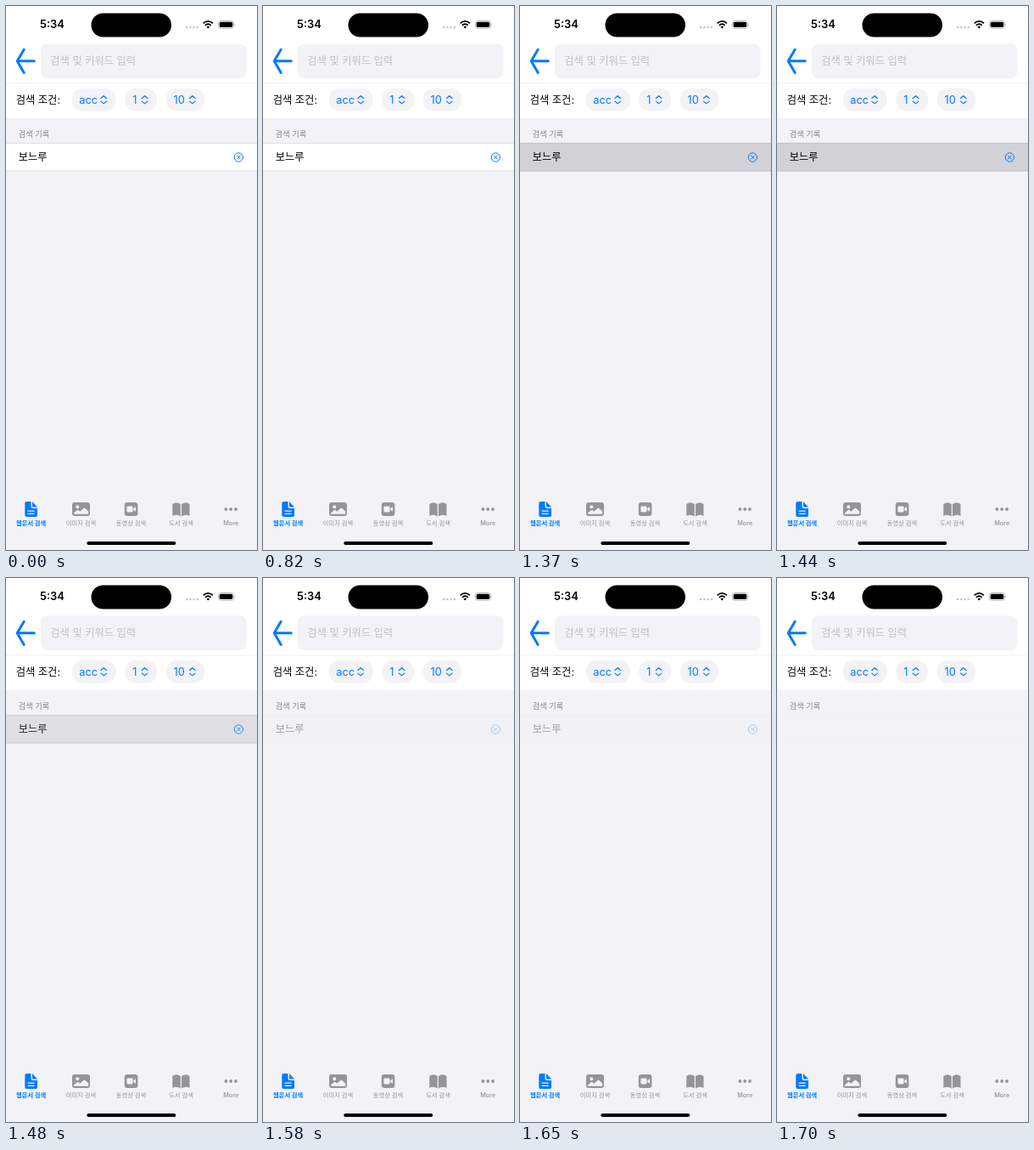
These frames come from a looping animation (296 by 640 pixels, 1.76 s). An HTML page:

```html
<!DOCTYPE html>
<html lang="ko">
<head>
<meta charset="utf-8">
<title>검색</title>
<style>
  html, body { margin: 0; width: 100%; height: 100%; overflow: hidden; background: #fff; }
  svg { display: block; width: 296px; height: 640px; }
  text { font-family: Inter, "Noto Sans CJK KR", "Noto Sans CJK", sans-serif; font-size: 12.3px; }
  .blue { fill: #007aff; }
  .line { fill: none; stroke: #007aff; stroke-linecap: round; stroke-linejoin: round; }
  .pale { fill: #f2f2f7; }
  .tab { fill: #949499; }
  .tab text, text.tab { font-size: 7.25px; font-weight: 500; text-anchor: middle; }
  .tab.on { fill: #007aff; }
  .opt { font-size: 12.8px; }
</style>
</head>
<body>
<svg viewBox="0 0 296 640">
  <defs>
    <path id="updown" class="line" stroke-width="1.2" d="M-3.3 -1.8L0 -4.6L3.3 -1.8M-3.3 1.8L0 4.6L3.3 1.8"/>
  </defs>
  <rect width="296" height="640" fill="#fff"/>
  <rect class="pale" y="132" width="296" height="508"/>

  <!-- status bar -->
  <text x="40" y="26.3" style="font-size:12.9px;font-weight:600">5:34</text>
  <rect x="100.5" y="8.5" width="94.5" height="28" rx="14"/>
  <g fill="#c4c4c6">
    <circle cx="213.2" cy="25" r="1.3"/><circle cx="217.4" cy="25" r="1.3"/>
    <circle cx="221.6" cy="25" r="1.3"/><circle cx="225.8" cy="25" r="1.3"/>
  </g>
  <g fill="none" stroke="#000" stroke-width="1.8">
    <path d="M232.6 20.4Q238.3 15.4 244 20.4M234.9 22.8Q238.3 19.8 241.7 22.8"/>
  </g>
  <path d="M236.4 24.6Q238.3 23 240.2 24.6L238.3 26.6Z"/>
  <rect x="250.4" y="17.4" width="18.2" height="9" rx="3" fill="none" stroke="#a8a8a8" stroke-width=".8"/>
  <rect x="251.7" y="18.7" width="15.6" height="6.4" rx="1.8"/>
  <path d="M269.6 20.4Q271 21.9 269.6 23.4Z" fill="#a8a8a8"/>

  <!-- search field -->
  <path class="line" stroke-width="3" d="M21.2 51.2L13.2 64.8L21.2 78.4M13.5 64.8H33.3"/>
  <rect class="pale" x="41" y="44.5" width="242.5" height="40.5" rx="7.5"/>
  <text x="52.3" y="69.3" fill="#c2c2c5">검색 및 키워드 입력</text>
  <rect y="90.5" width="296" height="1" fill="#efeff1"/>

  <!-- options -->
  <text x="11.7" y="114.8">검색 조건:</text>
  <g class="pale">
    <rect x="78" y="97" width="51.5" height="26.5" rx="12"/>
    <rect x="140.5" y="97" width="37.5" height="26.5" rx="12"/>
    <rect x="189" y="97" width="45" height="26.5" rx="12"/>
  </g>
  <g class="blue">
    <text class="opt" x="86.3" y="114.8">acc</text>
    <text class="opt" x="149.3" y="114.8">1</text>
    <text class="opt" x="197.6" y="114.8">10</text>
  </g>
  <use href="#updown" x="115.2" y="110.3"/>
  <use href="#updown" x="163.6" y="110.3"/>
  <use href="#updown" x="219.8" y="110.3"/>

  <!-- history -->
  <text x="14.8" y="154" fill="#858589" style="font-size:9.2px">검색 기록</text>
  <rect id="cell" y="161" width="296" height="33.5" fill="#fff"/>
  <path id="edges" d="M0 161.4H296M0 194.1H296" stroke="#d6d6d9" stroke-width=".8"/>
  <g id="entry">
    <text x="14.8" y="182.3" style="font-size:12.2px">보느루</text>
    <circle class="line" cx="274.4" cy="178" r="5.2" stroke-width="1"/>
    <path class="line" stroke-width="1" d="M272.5 175.9L276.3 180.1M276.3 175.9L272.5 180.1"/>
  </g>

  <!-- tab bar -->
  <g class="tab on">
    <path d="M24.5 583H29.5V588.5Q29.5 591 32 591H37V599Q37 601 35 601H24.5Q22.3 601 22.3 599V585Q22.3 583 24.5 583Z"/>
    <path d="M31 583L37 589.4H32.2Q31 589.4 31 588.2Z"/>
    <path d="M25.6 594.2H33.7M25.6 597.3H33.7" stroke="#f2f2f7" stroke-width="1.2"/>
    <text x="29.6" y="611.2" style="font-weight:700">웹문서 검색</text>
  </g>
  <g class="tab">
    <rect x="78" y="584" width="21" height="16" rx="3"/>
    <circle class="pale" cx="84.3" cy="589.2" r="2"/>
    <path class="pale" d="M80 597.8V596.5L83.8 593.2Q84.7 592.5 85.6 593.2L87.3 594.7L91.5 590.9Q92.4 590.2 93.3 590.9L97.2 594.6V597.8Z"/>
    <text x="88.5" y="611.2">이미지 검색</text>
  </g>
  <g class="tab">
    <rect x="139.8" y="584" width="15.6" height="16" rx="3"/>
    <rect class="pale" x="142.4" y="588.6" width="7.2" height="6.8" rx="1.4"/>
    <path class="pale" d="M150.4 591.1L153 589.2V594.8L150.4 592.9Z"/>
    <text x="147.5" y="611.2">동영상 검색</text>
  </g>
  <g class="tab">
    <path d="M205.8 586V600.4Q201.2 597.4 196.3 600V586Q200.8 582.4 205.8 586Z"/>
    <path d="M207 586V600.4Q211.6 597.4 216.5 600V586Q212 582.4 207 586Z"/>
    <text x="206.5" y="611.2">도서 검색</text>
  </g>
  <g class="tab">
    <circle cx="259.4" cy="592" r="1.9"/><circle cx="265.2" cy="592" r="1.9"/><circle cx="271" cy="592" r="1.9"/>
    <text x="265.2" y="611.2">More</text>
  </g>
  <rect x="95.3" y="630" width="105" height="4" rx="2"/>
</svg>
<script>
  const LOOP = 1760;
  // start ms, cell fill, edge colour, entry opacity
  const steps = [
    [0,    '#ffffff', '#d6d6d9', 1],
    [1370, '#d2d2d6', '#c0c0c4', 1],
    [1480, '#dfdfe3', '#cacace', 0.84],
    [1580, '#f1f1f6', '#ededf1', 0.34],
    [1700, '#f2f2f7', '#f2f2f7', 0],
    [LOOP, '#f2f2f7', '#f2f2f7', 0]
  ];

  function play(id, prop, column) {
    const frames = steps.map(s => ({ offset: s[0] / LOOP, [prop]: s[column], easing: 'step-end' }));
    const anim = document.getElementById(id).animate(frames, { duration: LOOP, iterations: Infinity });
    anim.startTime = 0;
  }

  play('cell', 'fill', 1);
  play('edges', 'stroke', 2);
  play('entry', 'opacity', 3);
</script>
</body>
</html>
```
